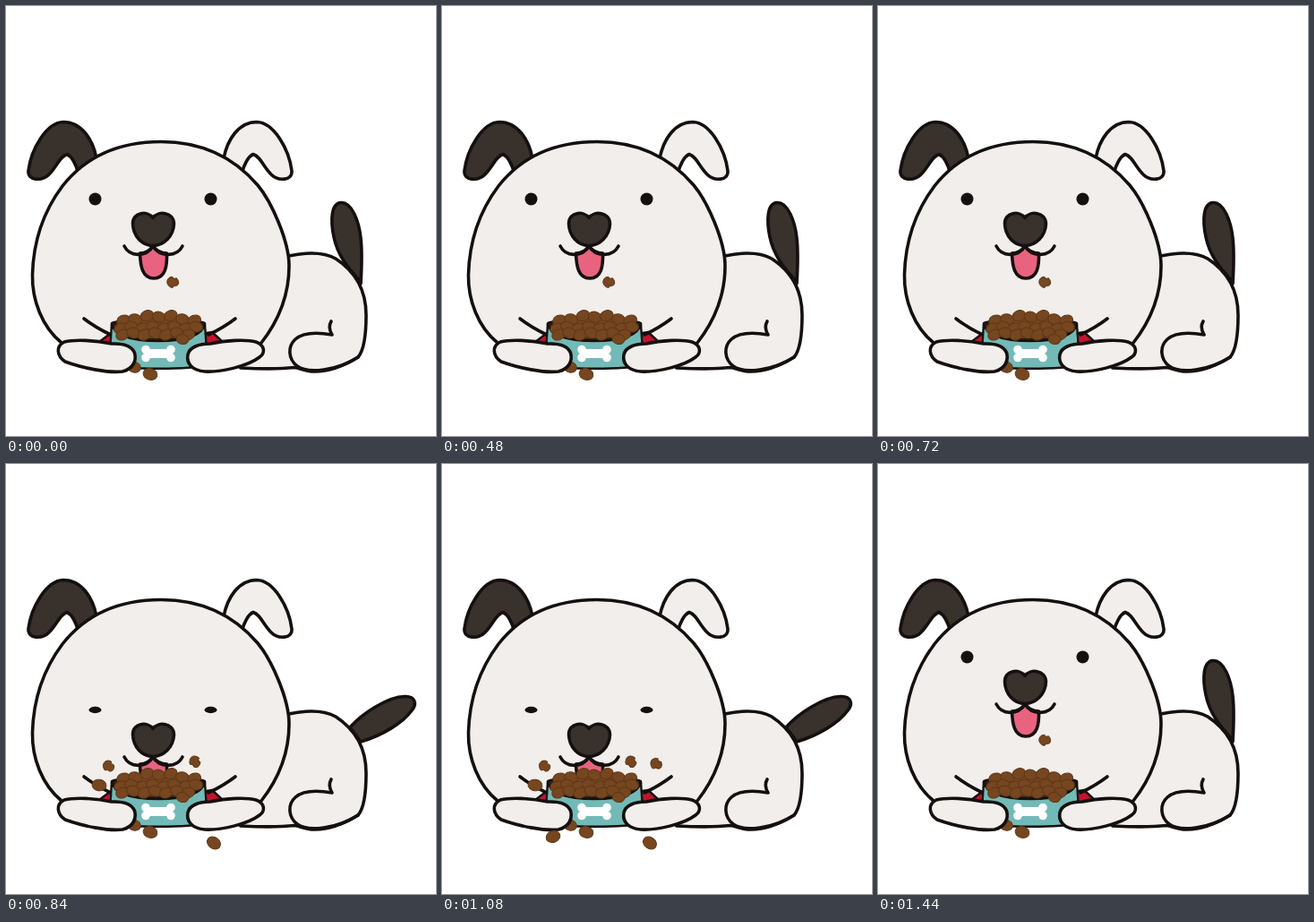
These frames come from a looping animation (480 px wide and 480 px high, 1.54 s). An HTML page:

```html
<!DOCTYPE html>
<html lang="en">
<head>
<meta charset="utf-8">
<title>Puppy at the bowl</title>
<style>
  html, body { margin: 0; width: 100%; height: 100%; overflow: hidden; background: #fff; }
  svg { display: block; width: 100%; height: 100%; }
  .ink { stroke: #15100f; stroke-width: 3.6; stroke-linecap: round; stroke-linejoin: round; }
  .thin { stroke-width: 2.4; }
  .fur { fill: #f1eeec; }
  .dark { fill: #39312b; }
  .line { fill: none; }
  .kib { fill: #754620; stroke: #623816; stroke-width: 1; }
</style>
</head>
<body>
<svg viewBox="0 0 480 480" xmlns="http://www.w3.org/2000/svg">
  <defs>
    <path id="ear" d="M101 170C97 150 85 129.500 64 129.500C45 130 28 160 25 184C24 195 40 196 48 188C57 179 60 168 68 165.500C74 168 78 177 81 187L100 190Z"/>
    <path id="bit" d="M-6 0C-6 -6 0 -7 3 -5Q2 -2 6 -1C7 4 4 6.500 1 6Q-1 3.500 -4 5Q-6 3 -6 0Z"/>
    <path id="head" d="M62 376C40 358 29 328 29.500 300C30.500 262 42 229 63 201C89 168 126 151.500 173 151.500C222 151.500 257 172 281 200C296 218 316 262 316 290C316 325 303 353 285 376"/>
  </defs>

  <path id="tailUp" class="ink dark" d="M395 307C382 293 370 278 366 258C362 239 363 220 374 219.500C386 219 394 240 396 259C398 277 397 293 396 310Z"/>
  <path id="tailDown" class="ink dark" d="M384 294C398 278 426 260 445 259.500C457 259 459 268 453 275C443 289 420 303 396 310Z"/>

  <path class="ink fur" d="M300 284C320 276 350 272 368 282C391 297 402 319 402 345C402 365 400 384 393 392C380 400 362 408 345 408C334 408 328 404 322 403.500C304 405.500 282 405 262 404L240 380Z"/>
  <path class="ink line" d="M363 352C360 357 361 362 364 367C347 364 331 365 323 372C314 380 315 394 325 402C337 411 370 407 393 392"/>

  <use href="#ear" class="ink dark"/>
  <use href="#ear" class="ink fur" transform="matrix(-1 0 0 1 344 0)"/>

  <path class="fur" d="M62 374H285L240 402H110Z"/>
  <use href="#head" class="ink fur"/>

  <path class="ink thin" fill="#c3142f" d="M104 375L116 366L124 378ZM218 366L230 364L242 375L218 379Z"/>
  <path class="ink line" d="M87 349Q100 359 117 367M256 349Q243 359 226 367"/>

  <g id="eyesUp" fill="#15100f"><circle cx="99.500" cy="215.500" r="7"/><circle cx="228.500" cy="215.500" r="7"/></g>
  <g id="eyesDown" fill="#15100f"><ellipse cx="99.500" cy="274.500" rx="7" ry="3.700"/><ellipse cx="228.500" cy="274.500" rx="7" ry="3.700"/></g>
  <g id="muzzle">
    <path class="ink" fill="#e8637f" d="M149.500 276C150 290 152 304 165 304C178 304 180 290 179.500 276Q170 276 164 268Q159 276 149.500 276Z"/>
    <path class="ink line" d="M132 268C138 280 156 281 164 268C172 281 191 280 197 268"/>
    <path class="ink dark" d="M164 236.500C158 228 141.500 230 141.500 243C142 257 152 267.500 164 267.500C176 267.500 187 257 187.500 243C187 230 170 228 164 236.500Z"/>
  </g>

  <path class="ink thin" fill="#2b211b" d="M118 354C117 366 135 374 170 374C205 374 223 366 222 354C213 349 127 349 118 354Z"/>
  <path class="ink thin" fill="#72bab7" d="M118 355C121 369 142 374 170 374C198 374 219 369 222 355L225 401C204 406 136 406 115 401Z"/>
  <g fill="#fff">
    <rect x="156" y="383" width="28" height="10"/>
    <circle cx="156" cy="383.500" r="4.800"/><circle cx="156" cy="392.500" r="4.800"/>
    <circle cx="184" cy="383.500" r="4.800"/><circle cx="184" cy="392.500" r="4.800"/>
  </g>
  <g id="pile"><path fill="#754620" d="M128 353Q170 338 212 352L208 368Q170 374 130 368Z"/></g>

  <path class="ink fur" d="M118 377C100 373 76 372 65 375C55 380 57 391 66 397C85 404 114 410 130 408C142 405 146 396 143.500 387C140 379 129 376.500 118 377Z"/>
  <path class="ink fur" d="M228 377C245 373 269 372 279 375C290 379 289 388 283 392C270 402 240 409 222 408C208 407 201 399 203 389C205 381 215 377 228 377Z"/>
  <g id="crumbs"></g>
</svg>
<script>
const NS = "http://www.w3.org/2000/svg";
const $ = id => document.getElementById(id);
const STEP = 120, LOOP = 1540, DIP = 59;

function add(parent, tag, attrs) {
  const el = document.createElementNS(NS, tag);
  for (const k in attrs) el.setAttribute(k, attrs[k]);
  return parent.appendChild(el);
}
function kibble(parent, x, y, rot = 0, rx = 8, ry = 6.3) {
  return add(parent, "ellipse", { class: "kib", rx, ry, transform: `translate(${x} ${y}) rotate(${rot})` });
}
function bit(x, y, rot = 0) {
  return add($("crumbs"), "use", { href: "#bit", class: "kib", transform: `translate(${x} ${y}) rotate(${rot})` });
}

// Heaped food: rows of [first x, y, count, gap]
[[131, 351, 7, 13.2], [128, 360, 8, 12], [130, 367, 7, 12.2]].forEach(([x, y, n, gap], row) => {
  for (let i = 0; i < n; i++) {
    const u = i / (n - 1) * 2 - 1;
    const lift = row ? 2 * (i % 2) : 6 * (1 - u * u) - 2 * (i % 2);
    kibble($("pile"), x + i * gap, y - lift, i % 2 ? 15 : -20, 7.5, 5.8);
  }
});
kibble($("pile"), 197, 372, 10, 7, 5.5);
kibble($("pile"), 143, 403, 20, 7.5, 6);
kibble($("pile"), 161, 411, 15);

// Each loose piece shows on "down" beats within [from, to]
const c = $("crumbs");
const loose = [
  [kibble(c, 207, 331, -25), 3, 5],
  [kibble(c, 119, 342.5, 25), 5, 5],
  [bit(114.5, 337), 7, 11],
  [kibble(c, 104, 358.5, 10), 7, 11],
  [bit(211, 332, 20), 7, 11],
  [kibble(c, 232, 423, 35), 7, 11],
  [bit(239, 334.5, -10), 9, 11],
  [kibble(c, 124, 416, -20), 9, 11],
  [kibble(c, 63.5, 409, -30), 11, 11]
];
const drop = bit(186, 308, -35);
const show = (el, on) => el.setAttribute("visibility", on ? "visible" : "hidden");

function draw(ms) {
  const beat = Math.floor(ms % LOOP / STEP);
  const down = beat % 2 === 1;
  show($("tailUp"), !down);
  show($("tailDown"), down);
  show($("eyesUp"), !down);
  show($("eyesDown"), down);
  show(drop, !down);
  $("muzzle").setAttribute("transform", `translate(0 ${down ? DIP : 0})`);
  for (const [el, from, to] of loose) show(el, down && beat >= from && beat <= to);
}

const start = performance.now();
function tick(now) {
  draw(Math.max(0, now - start));
  requestAnimationFrame(tick);
}
draw(0);
requestAnimationFrame(tick);
</script>
</body>
</html>
```
